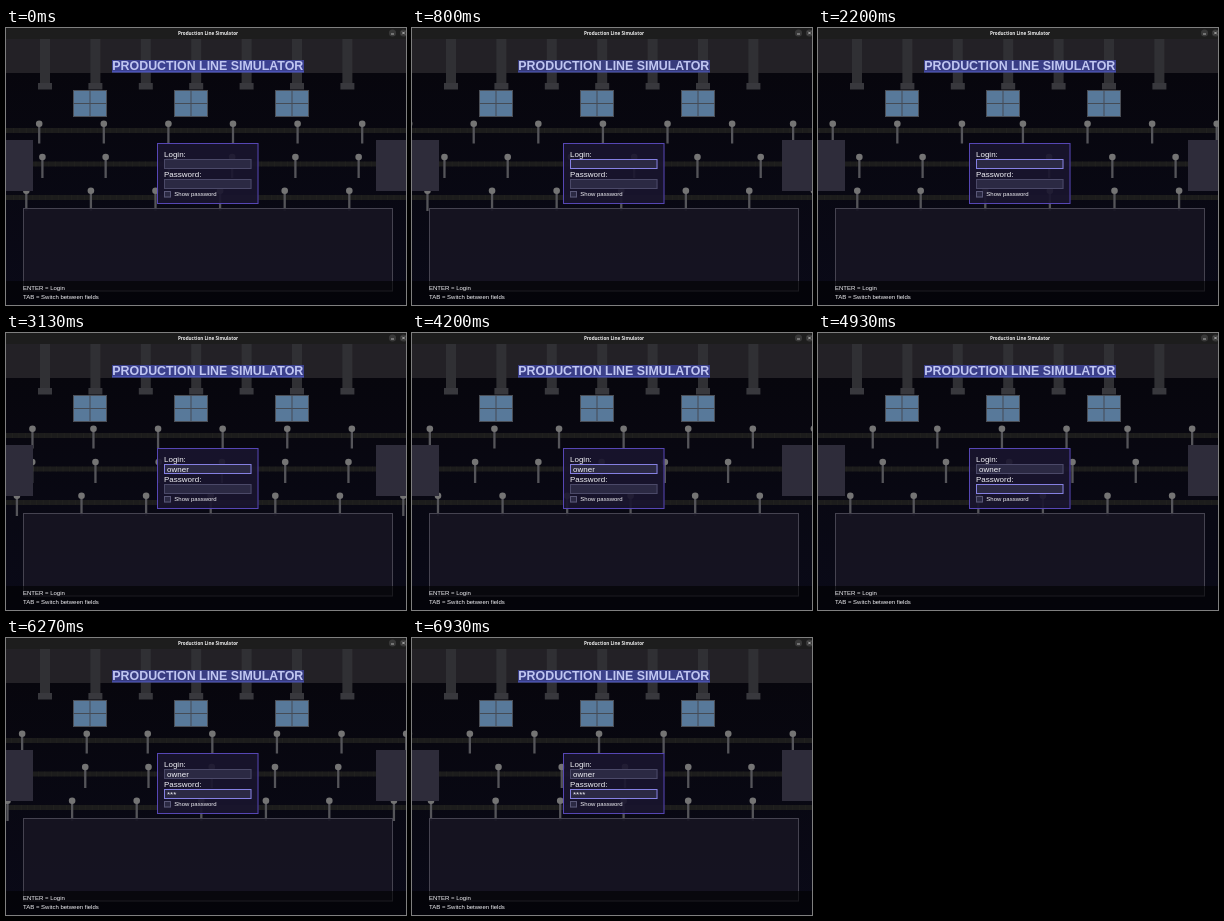
Animation, 400 px wide and 277 px high, one loop 7 s. Source, as an HTML page with a canvas:

```html
<!DOCTYPE html>
<html lang="en">
<head>
<meta charset="utf-8">
<title>Production Line Simulator</title>
<style>
html, body { margin: 0; width: 100%; height: 100%; overflow: hidden; background: #08080f; }
canvas { display: block; width: 400px; height: 277px; }
</style>
</head>
<body>
<canvas id="stage" width="400" height="277"></canvas>
<script>
const ctx = document.getElementById('stage').getContext('2d');
const LOOP = 7000, STEPS = 105, ITEMS = 7, MARGIN = 30;
const SANS = '"Liberation Sans", Arial, sans-serif';
const USER = 'owner', PASS = '****';

// x: start, gap: spacing, wrap: belt length, v: shift per step,
// y: ball centre, belt: belt top, end: rod bottom
const rows = [
  { x: 33.2, gap: 64.6, wrap: 448.6, v: -8.39, y: 95.7, belt: 100, end: 115.5 },
  { x: 36.4, gap: 63.25, wrap: 442.75, v: -5.6, y: 129, belt: 133.5, end: 150 },
  { x: 20.3, gap: 64.6, wrap: 451, v: -11.17, y: 162.7, belt: 167, end: 183 }
];

const mod = (a, n) => ((a % n) + n) % n;

function rect(x, y, w, h, fill, stroke) {
  ctx.fillStyle = fill;
  ctx.fillRect(x, y, w, h);
  if (!stroke) return;
  ctx.strokeStyle = stroke;
  ctx.lineWidth = 1;
  ctx.strokeRect(x + .5, y + .5, w - 1, h - 1);
}

function disc(x, y, r, fill) {
  ctx.fillStyle = fill;
  ctx.beginPath();
  ctx.arc(x, y, r, 0, 7);
  ctx.fill();
}

function line(x1, y1, x2, y2, color, width = 1) {
  ctx.strokeStyle = color;
  ctx.lineWidth = width;
  ctx.beginPath();
  ctx.moveTo(x1, y1);
  ctx.lineTo(x2, y2);
  ctx.stroke();
}

function text(s, x, y, size, color = '#f4f4f8', weight = '', align = 'left', family = SANS) {
  ctx.font = `${weight} ${size}px ${family}`;
  ctx.textAlign = align;
  ctx.fillStyle = color;
  ctx.fillText(s, x, y);
}

function drawHall() {
  const wall = ctx.createLinearGradient(0, 45, 0, 277);
  wall.addColorStop(0, '#07060d');
  wall.addColorStop(1, '#0a0a18');
  rect(0, 0, 400, 277, wall);
  rect(0, 11, 400, 34, '#232126');
  for (let i = 0; i < 7; i++) {
    const x = 39 + i * 50.4;
    rect(x - 5, 11, 10, 44, '#303034');
    rect(x - 7, 55, 14, 6.5, '#38383d');
  }
  for (let x = 67; x < 300; x += 101) {
    rect(x, 62, 34, 27, '#58799a', '#4b4f57');
    line(x + 17, 62, x + 17, 88, '#454b55');
    line(x, 75.5, x + 34, 75.5, '#454b55');
  }
}

function drawRow({ x, gap, wrap, v, y, belt, end }, step) {
  const shift = x + v * step;
  rect(0, belt, 400, 5, '#1c1c1c');
  for (let m = mod(shift, 6.45); m < 400; m += 6.45)
    line(m, belt, m, belt + 5, '#242421', .7);
  for (let i = 0; i < ITEMS; i++) {
    const b = mod(shift + i * gap + MARGIN, wrap) - MARGIN;
    line(b, y, b, end, '#55555a', 2.3);
    disc(b, y, 3.3, '#747474');
  }
}

function drawTitle(t) {
  const glow = .5 - .5 * Math.cos((t - 1530) / 1010 * 2 * Math.PI);
  rect(106, 32, 192, 12, `rgba(68,76,180,${.4 + .35 * glow})`);
  line(106, 44, 298, 44, `rgba(92,104,225,${.4 + .5 * glow})`);
  text('PRODUCTION LINE SIMULATOR', 201.8, 42, 12.4, '#c0c6f2', 'bold', 'center');
}

function drawField(y, value, focused) {
  rect(158, y, 87.5, 10, '#2b2943', focused ? '#8580e2' : '#4b4968');
  text(value, 161, y + 8.2, 8);
}

function drawDialog(t) {
  const typed = (s, start, gap) => s.slice(0, Math.max(0, Math.floor((t - start) / gap) + 1));
  rect(151, 115, 101.5, 61, 'rgba(25,21,46,.9)', '#5646b4');
  text('Login:', 158, 129, 8);
  drawField(131, typed(USER, 2400, 130), t >= 800 && t < 4750);
  text('Password:', 158, 149, 8);
  drawField(151, typed(PASS, 5900, 170), t >= 4750);
  rect(158, 163, 7, 6.5, '#2b2943', '#5a5878');
  text('Show password', 168.3, 168.4, 6);
}

function drawChrome() {
  rect(0, 0, 400, 11, '#1d1d1d');
  text('Production Line Simulator', 202, 6.8, 4.62, '#eeeeee', 'bold', 'center', '"Open Sans", sans-serif');
  disc(386.5, 5, 3.6, '#383838');
  disc(397.5, 5, 3.6, '#383838');
  line(385, 6, 388, 6, '#dddddd', .7);
  line(396.2, 3.7, 398.8, 6.3, '#dddddd', .7);
  line(398.8, 3.7, 396.2, 6.3, '#dddddd', .7);
}

function draw(now) {
  // Small lead makes up for step times rounded to 10 ms
  const step = Math.min(STEPS - 1, Math.floor((now % LOOP + 5) * STEPS / LOOP));
  const t = step * LOOP / STEPS;
  drawHall();
  rows.forEach(row => drawRow(row, step));
  rect(0, 112, 27, 51, '#2e2c3a');
  rect(370, 112, 30, 51, '#2e2c3a');
  rect(17, 180, 370, 83.5, 'rgba(22,20,34,.93)', '#454350');
  rect(0, 253, 400, 24, 'rgba(0,0,0,.6)');
  text('ENTER = Login', 17, 262.3, 6);
  text('TAB = Switch between fields', 17, 270.5, 6);
  drawTitle(t);
  drawDialog(t);
  drawChrome();
}

const start = performance.now();
function tick() {
  draw(performance.now() - start);
  requestAnimationFrame(tick);
}
tick();
</script>
</body>
</html>
```
